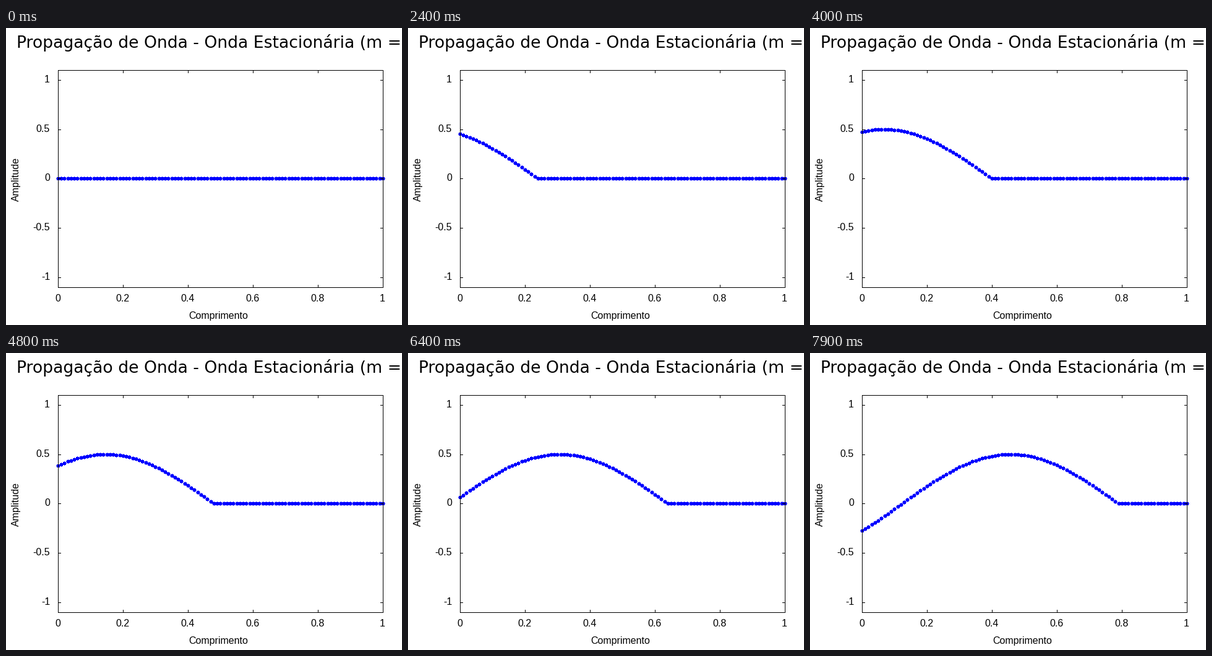
Recreate the animation shown at these times as a matplotlib script. Size 640 by 480 pixels, loop 8 s.

```python
import numpy as np
import matplotlib.pyplot as plt
from matplotlib.animation import FuncAnimation
from matplotlib.path import Path

W, H, DPI = 640, 480, 100
PX = 72 / DPI                      # one pixel in points
LEFT, RIGHT, TOP, BOTTOM = 84, 609, 68, 419
FRAMES, INTERVAL = 80, 100
AMP, K = 0.5, 1.5 * np.pi
TICK = 5

fig = plt.figure(figsize=(W / DPI, H / DPI), dpi=DPI, facecolor="white")
ax = fig.add_axes([0, 0, 1, 1])
ax.set_xlim(0, W)
ax.set_ylim(H, 0)
ax.axis("off")


def to_x(x):
    return np.round(LEFT + np.asarray(x) * (RIGHT - LEFT) - 0.01)


def to_y(y):
    return np.floor(BOTTOM - (np.asarray(y) + 1.1) * (BOTTOM - TOP) / 2.2 + 0.49)


def line(x0, y0, x1, y1):
    # Agg snaps whole coordinates to the centre of that pixel
    ax.plot([x0, x1], [y0, y1], color="black", lw=PX, antialiased=False,
            solid_capstyle="projecting", zorder=3)


def label(x, y, text, size=16, font="Liberation Sans", **kw):
    ax.text(x, y, text, fontsize=size * PX, family=font, color="black",
            va=kw.pop("va", "baseline"), **kw)


def blob():
    """Pixel marker: a 5x5 block with a one-pixel tip on each side."""
    cells = [(i, j) for i in range(-3, 4) for j in range(-3, 4)
             if i * j == 0 or max(abs(i), abs(j)) < 3]
    box = np.array([(-.5, -.5), (.5, -.5), (.5, .5), (-.5, .5), (-.5, -.5)])
    return Path.make_compound_path(
        *[Path(box + c, closed=True) for c in cells])


# Frame and ticks
for y in (TOP, BOTTOM):
    line(LEFT, y, RIGHT, y)
for x in (LEFT, RIGHT):
    line(x, TOP, x, BOTTOM)

for v in np.arange(6) / 5:
    x = to_x(v)
    line(x, TOP, x, TOP + TICK - 1)
    line(x, BOTTOM, x, BOTTOM - TICK + 1)
    label(x - 0.5, 442, f"{v:g}", ha="center")

for v in (-1, -0.5, 0, 0.5, 1):
    y = to_y(v)
    line(LEFT, y, LEFT + TICK - 1, y)
    line(RIGHT, y, RIGHT - TICK + 1, y)
    label(71, y + 4, f"{v:g}", ha="right")

label(17, 32, "Propagação de Onda - Onda Estacionária (m =", 26.6,
      "DejaVu Sans")
label(343, 470, "Comprimento", ha="center")
label(24, 244, "Amplitude", rotation=90, ha="right", va="center")

# Travelling wave
xs = np.arange(101) / 100
wave, = ax.plot([], [], ls="none", marker=blob(), ms=7 * PX, mfc="blue",
                mec="none", mew=0, antialiased=False, zorder=2)


def update(n):
    lag = np.maximum(n / 100 - xs, 0)
    wave.set_data(to_x(xs), to_y(AMP * np.sin(K * lag)))
    return wave,


anim = FuncAnimation(fig, update, frames=FRAMES, interval=INTERVAL,
                     repeat=True, repeat_delay=0)
plt.show()
```
